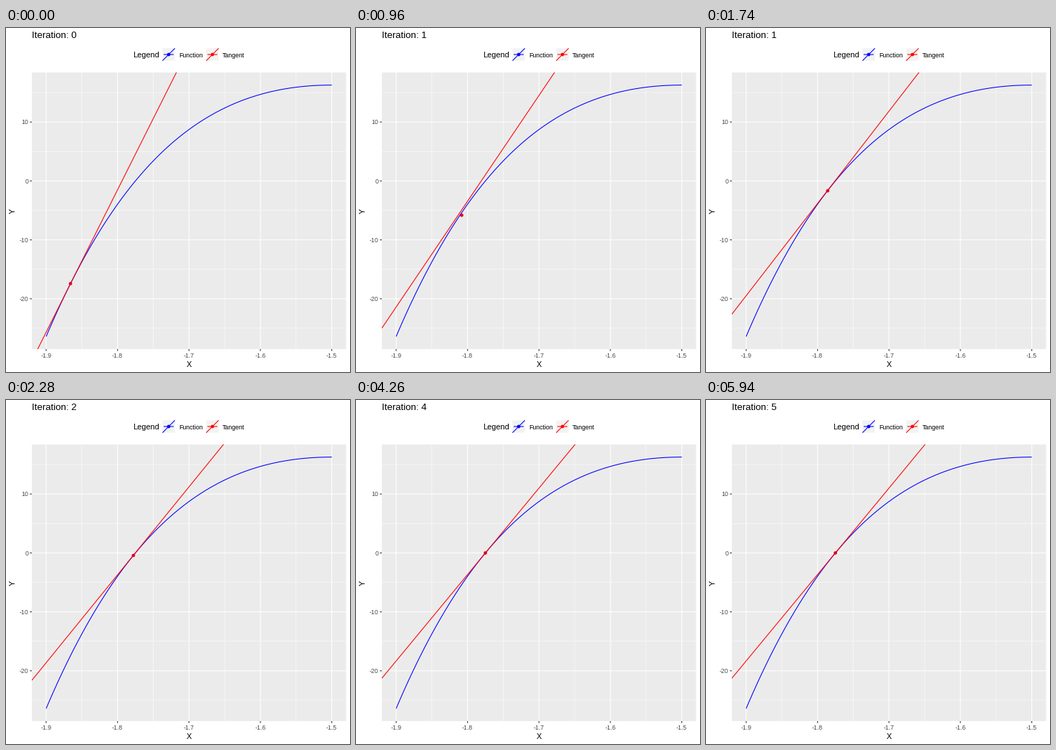
A matplotlib script that plays this animation: 480 px wide and 480 px high, repeating every 6000 ms.

```python
import numpy as np
import matplotlib.pyplot as plt
from matplotlib.animation import FuncAnimation
from matplotlib.patches import Circle, Rectangle

plt.rcParams["font.family"] = "Liberation Sans"
plt.rcParams["path.snap"] = False

SIZE, FRAMES, STEPS = 480, 100, 5
LEFT, RIGHT, TOP, BOTTOM = 36.1, 474.5, 62.1, 448.0
LINE, THIN = 1.07, 0.53
GREY = "#4D4D4D"


def f(x):
    v = -(x + 1.5)
    return 16.27 - 134.7 * v**2 - 210 * v**3 - 300 * v**4


def slope_at(x):
    v = -(x + 1.5)
    return 269.4 * v + 630 * v**2 + 1200 * v**3


def padded(lo, hi):
    pad = 0.05 * (hi - lo)
    return lo - pad, hi + pad


X0, X1 = padded(-1.9, -1.5)
Y0, Y1 = padded(f(-1.9), f(-1.5))


def px(x):
    return LEFT + (x - X0) / (X1 - X0) * (RIGHT - LEFT)


def py(y):
    return BOTTOM - (y - Y0) / (Y1 - Y0) * (BOTTOM - TOP)


# Newton steps: touch point, slope and intercept of each tangent
roots = [-1.8659]
for _ in range(STEPS):
    roots.append(roots[-1] - f(roots[-1]) / slope_at(roots[-1]))
roots = np.array(roots)
heights, slopes = f(roots), slope_at(roots)
states = np.array([roots, heights, slopes, heights - slopes * roots])
keys = np.round(np.arange(STEPS + 1) * (FRAMES - 1) / STEPS)

fig = plt.figure(figsize=(SIZE / 72, SIZE / 72), dpi=72, facecolor="white")
ax = fig.add_axes([0, 0, 1, 1])
ax.set(xlim=(0, SIZE), ylim=(SIZE, 0))
ax.axis("off")


def box(x, y, w, h, color):
    return ax.add_patch(Rectangle((x, y), w, h, fc=color, lw=0, zorder=0))


def line(xs, ys, color, width=LINE, z=1):
    return ax.plot(xs, ys, color=color, lw=width, zorder=z,
                   solid_capstyle="butt")[0]


def dot(x, y, color):
    return ax.add_patch(Circle((x, y), 1.95, fc=color, ec=color, lw=0.75,
                               zorder=3))


def label(x, y, text, size, color="black", ha="left", **kw):
    return ax.text(x, y, text, fontsize=size, color=color, ha=ha,
                   va="baseline", **kw)


panel = box(LEFT, TOP, RIGHT - LEFT, BOTTOM - TOP, "#EBEBEB")

# Grid, ticks and axis labels
for x in np.arange(-1.85, -1.5, 0.1):
    line([px(x)] * 2, [TOP, BOTTOM], "white", THIN)
for y in range(-25, 16, 10):
    line([LEFT, RIGHT], [py(y)] * 2, "white", THIN)
for i in range(5):
    x = -1.9 + i * 0.1
    line([px(x)] * 2, [TOP, BOTTOM], "white", z=2)
    line([px(x)] * 2, [BOTTOM, BOTTOM + 2.75], "#333333")
    label(px(x), 460, f"{x:.1f}", 8.8, GREY, "center")
for y in range(-20, 11, 10):
    line([LEFT, RIGHT], [py(y)] * 2, "white", z=2)
    line([LEFT - 2.75, LEFT], [py(y)] * 2, "#333333")
    label(31.2, py(y) + 3.1, str(y), 8.8, GREY, "right")
label((LEFT + RIGHT) / 2, 473, "X", 11, ha="center")
label(13, (TOP + BOTTOM) / 2, "Y", 11, ha="center", rotation=90,
      rotation_mode="anchor")
title = label(36, 14, "", 13.2)

# Legend
label(177, 41, "Legend", 11)
for cx, name, color in ((227, "Function", "blue"), (288, "Tangent", "red")):
    cy, r = 37, 8.64
    box(cx - r, cy - r, 2 * r, 2 * r, "#F2F2F2")
    dot(cx, cy, color)
    line([cx - 0.8 * r, cx + 0.8 * r], [cy, cy], color, z=4)
    line([cx - r, cx + r], [cy + r, cy - r], color, z=5)
    label(cx + 14, 41, name, 8.8)

curve_x = np.linspace(-1.9, -1.5, 101)
line(px(curve_x), py(f(curve_x)), "blue", z=4)
point = dot(0, 0, "red")
tangent = line([], [], "red", z=5)
tangent.set_clip_path(panel)
edges = np.array([X0, X1])


def update(k):
    x, y, slope, icept = (np.interp(k, keys, row) for row in states)
    point.center = px(x), py(y)
    tangent.set_data(px(edges), py(slope * edges + icept))
    title.set_text(f"Iteration: {round(STEPS * k / (FRAMES - 1))}")
    return point, tangent, title


anim = FuncAnimation(fig, update, frames=FRAMES, interval=60, repeat=True,
                     repeat_delay=0, blit=False)
plt.show()
```
